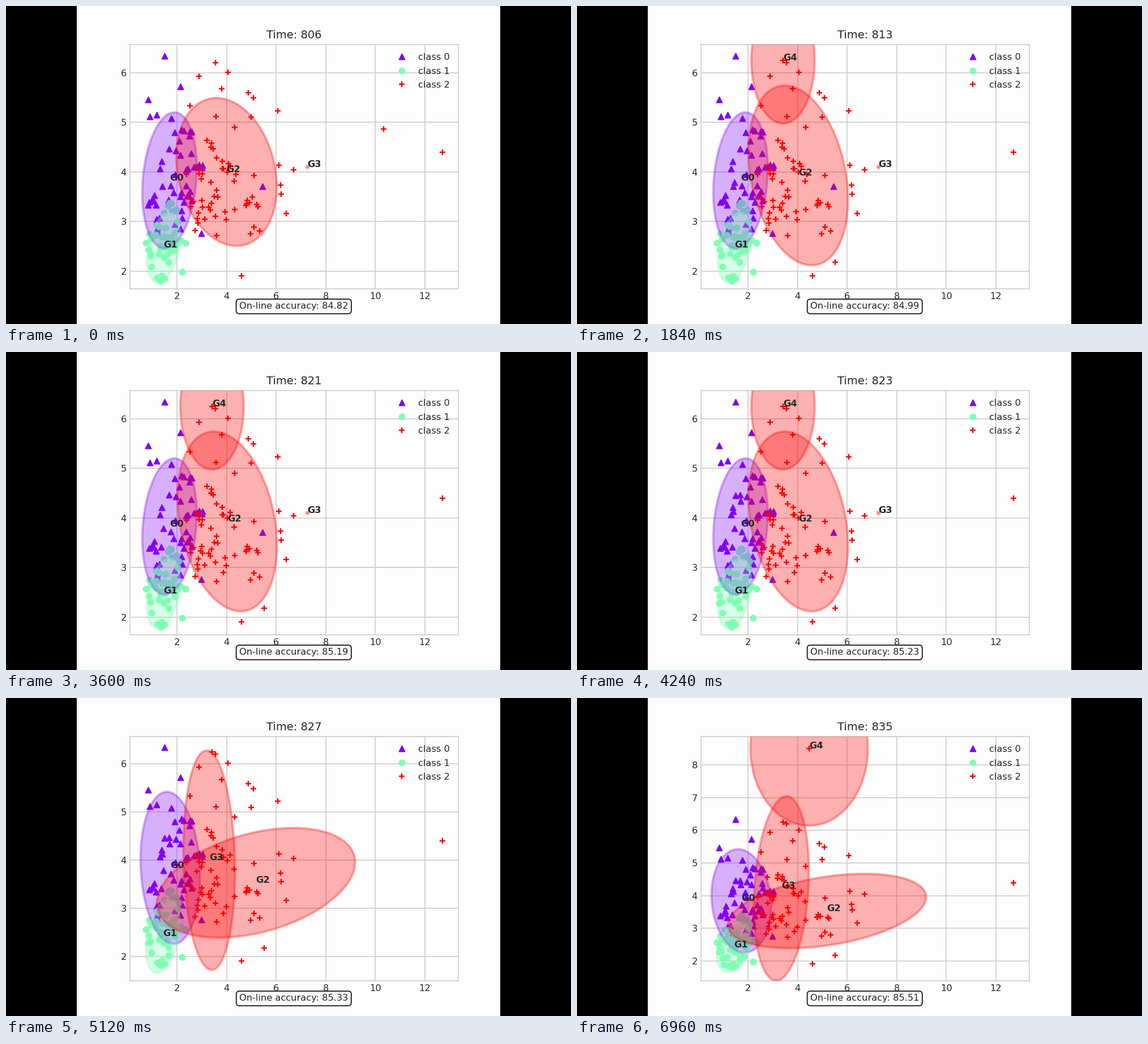
Recreate the animation shown at these times as a matplotlib script. Size 998x561 px, loop 7000 ms.

```python
import numpy as np
import matplotlib.pyplot as plt
from matplotlib.animation import FuncAnimation
from matplotlib.patches import Polygon, Rectangle
from matplotlib.ticker import MultipleLocator
from matplotlib.transforms import Affine2D

W, H = 998, 561
K = 1.16875                      # zoom of the chart panel
INK, PAPER, GRID = "#262626", "#fdfdfd", "#cccccc"
COLORS = ["#8000ff", "#80ffb4", "#ff0000"]
MARKERS = ["^", "o", "+"]
LEFT, RIGHT, TOP, BOTTOM = 218.5, 798.7, 68, 499.3
FRAMES_PER_STEP, STEPS, FRAMES = 6, 30, 175
WINDOW = 200                     # steps a sample stays on the chart

rng = np.random.default_rng(7)
turn = np.linspace(0, 2 * np.pi, 160)


def oval(cx, cy, half_w, half_h, lean, angle=turn, radius=1):
    """Points of a leaning ellipse; lean moves its top sideways."""
    return np.column_stack([
        cx + half_w * radius * np.cos(angle),
        cy + half_h * radius * np.sin(angle + np.arcsin(lean))])


def cloud(count, *shape):
    return oval(*shape, angle=rng.uniform(0, 2 * np.pi, count),
                radius=np.sqrt(rng.random(count)))


CLOUDS = [
    cloud(56, 1.95, 3.8, 1.15, 1.1, .35),
    cloud(54, 1.48, 2.6, .72, .82, .35),
    np.vstack([cloud(36, 3.2, 3.6, .95, 1.1, -.1),
               cloud(24, 4.9, 3.65, 1.5, .9, -.1)]),
]
BIRTHS = [rng.integers(-WINDOW, STEPS, len(points)) for points in CLOUDS]

# Stray samples outside the clouds
STRAYS = [
    [(1.5, 6.34), (2.14, 5.72), (.84, 5.46), (.9, 5.12), (1.18, 5.15),
     (1.77, 5.08), (2.98, 2.77)],
    [(2.34, 2.57), (2.21, 1.99), (.74, 2.57)],
    [(3.55, 6.2), (2.89, 5.93), (4.05, 6.01), (3.8, 5.67), (4.88, 5.59),
     (5.08, 5.49), (6.06, 5.23), (12.71, 4.4), (2.53, 5.33), (3.58, 5.11),
     (4.99, 5.1), (4.33, 4.9), (6.11, 4.13), (6.7, 4.04), (6.41, 3.16),
     (4.6, 1.91)],
]
# class, position, first step, step when gone
VISITORS = [
    (0, (5.45, 3.71), 0, 20),
    (2, (10.33, 4.86), 0, 5),
    (2, (3.42, 6.25), 4, STEPS),
    (2, (5.52, 2.18), 6, STEPS),
    (2, (4.47, 8.5), 23, STEPS),
]

# Group ellipses: centre, half width, half height, lean
EARLY = {0: (1.7, 3.83, 1.1, 1.37, .18), 1: (1.46, 2.48, .67, .7, .35),
         2: (4, 4, 2.03, 1.49, -.2), 3: (7.27, 4.1, .045, .025, 0)}
SPLIT = EARLY | {2: (4.03, 3.93, 2.01, 1.81, -.27),
                 4: (3.415, 6.245, 1.28, 1.27, 0)}
MERGED = {0: (1.73, 3.84, 1.2, 1.58, -.11), 1: (1.43, 2.42, .68, .76, .35),
          2: (5.19, 3.53, 4, 1.14, .375), 3: (3.3, 4, 1.04, 2.28, -.1)}
LATE = MERGED | {3: (3.35, 4.22, 1.11, 2.82, .19), 4: (4.47, 8.5, 2.37, 2.36, 0)}
# first step, y limits, ellipses
PHASES = [(0, (1.643, 6.565), EARLY), (4, (1.643, 6.565), SPLIT),
          (20, (1.49, 6.569), MERGED), (23, (1.388, 8.867), LATE)]

plt.rcParams["font.family"] = "DejaVu Sans"
fig = plt.figure(figsize=(W / 100, H / 100), dpi=100, facecolor="black")
stage = Affine2D().scale(1 / W, -1 / H).translate(0, 1) + fig.transFigure
fig.add_artist(Rectangle((125, 0), 748, H, transform=stage, color=PAPER, lw=0, zorder=-5))

ax = fig.add_axes([LEFT / W, 1 - BOTTOM / H, (RIGHT - LEFT) / W, (BOTTOM - TOP) / H],
                  facecolor=PAPER)
ax.set_xlim(0.0936, 13.347)
ax.xaxis.set_major_locator(MultipleLocator(2))
ax.yaxis.set_major_locator(MultipleLocator(1))
ax.set_axisbelow(True)
ax.grid(color=GRID, lw=K)
ax.tick_params(length=0, pad=3.5 * K, labelsize=10 * K, labelcolor=INK)
for spine in ax.spines.values():
    spine.set(color=GRID, lw=K)


def scatter(kind, xy, **options):
    line = 1.5 if MARKERS[kind] == "+" else 1
    return ax.scatter(*xy, s=40 * K * K, marker=MARKERS[kind], c=COLORS[kind],
                      linewidths=line * K, **options)


def label(x, y, text="", size=10, **options):
    return ax.text(x, y, text, fontsize=size * K, color=INK, **options)


dots = [scatter(kind, ([], []), zorder=2) for kind in range(3)]
blobs, tags = [], []
for group in range(5):
    color = COLORS[min(group, 2)]
    blob = Polygon(oval(0, 0, 1, 1, 0), facecolor=color, edgecolor=color,
                   alpha=0.3, lw=2.5 * K, zorder=3)
    blobs.append(ax.add_patch(blob))
    tags.append(label(0, 0, f"G{group}", weight="bold", zorder=4, clip_on=True))

for kind in range(3):
    y = 89.5 + 24.5 * kind
    scatter(kind, ([699], [y]), transform=stage, zorder=5)
    label(728, y + 5.5, f"class {kind}", transform=stage, zorder=5)

title = label(508.5, 57, size=12, transform=stage, ha="center")
accuracy = label(508.3, 530, transform=stage, ha="center", va="center", zorder=6,
                 bbox=dict(boxstyle="round,pad=0.33", fc=PAPER, ec=INK, lw=1.2 * K))


def visible_points(kind, step):
    age = step - BIRTHS[kind]
    current = CLOUDS[kind][(age >= 0) & (age < WINDOW)]
    visitors = [xy for k, xy, first, gone in VISITORS
                if k == kind and first <= step < gone]
    return np.vstack([current, STRAYS[kind] + visitors])


def update(frame):
    step = frame // FRAMES_PER_STEP
    time = 806 + step
    title.set_text(f"Time: {time}")
    accuracy.set_text(f"On-line accuracy: {100 * (time - 292) / (time - 200):.2f}")

    for kind, collection in enumerate(dots):
        collection.set_offsets(visible_points(kind, step))

    _, limits, shapes = [phase for phase in PHASES if phase[0] <= step][-1]
    ax.set_ylim(limits)
    for group, (blob, tag) in enumerate(zip(blobs, tags)):
        shown = group in shapes
        blob.set_visible(shown)
        tag.set_visible(shown)
        if shown:
            blob.set_xy(oval(*shapes[group]))
            tag.set_position(shapes[group][:2])
    return []


animation = FuncAnimation(fig, update, frames=FRAMES, init_func=lambda: update(0),
                          interval=40, repeat=True, repeat_delay=0, blit=False)
plt.show()
```
